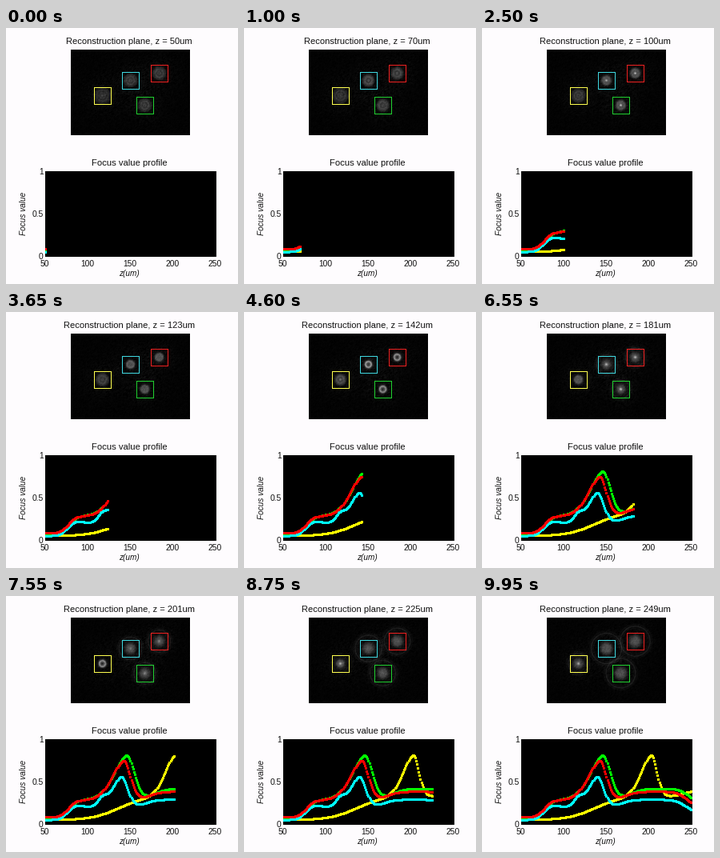
Recreate the animation shown at these times as a matplotlib script. Size 290 px wide and 320 px high, loop 10 s.

```python
import numpy as np
import matplotlib.pyplot as plt
from matplotlib.animation import FuncAnimation
from matplotlib.patches import Rectangle

W, H, DPI = 290, 320, 100
PX = 72 / DPI  # points per pixel
Z0, STEPS = 50, 200

plt.rcParams["font.family"] = "Liberation Sans"
fig = plt.figure(figsize=(W / DPI, H / DPI), dpi=DPI, facecolor="#fefcfe")


def label(x, y, text, size, **kw):
    kw = {"ha": "center", "va": "baseline", "color": "#111111", **kw}
    return fig.text(x / W, 1 - y / H, text, fontsize=size * PX, **kw)


def panel(left, top, right, bottom):
    ax = fig.add_axes([left / W, 1 - bottom / H,
                       (right - left) / W, (bottom - top) / H])
    ax.set(facecolor="black", xticks=[], yticks=[],
           xlim=(left, right), ylim=(bottom, top))
    for spine in ax.spines.values():
        spine.set_visible(False)
    return ax


def rise(z, centre, width):
    return 1 / (1 + np.exp(-(z - centre) / width))


def peak(z, centre, left, right):
    width = np.where(z < centre, left, right)
    return np.exp(-(np.abs(z - centre) / width) ** 1.8)


def bump(x, centre, width):
    return np.exp(-((x - centre) / width) ** 2)


# Focus value curves: a plateau, the focus peak, then a long tail
depth = np.arange(Z0, Z0 + STEPS)


def yellow(z):
    return (.05 + .28 * rise(z, 136, 16) + .49 * peak(z, 203, 17.5, 8.6)
            + .06 * rise(z, 239, 5))


def green(z):
    return (.075 + .215 * rise(z, 78, 5) + .52 * peak(z, 146, 21.5, 12)
            + .13 * rise(z, 178, 7) - .2 * rise(z, 248, 6))


def cyan(z):
    return (.05 + .155 * rise(z, 75, 4) + .355 * peak(z, 139.5, 15, 10)
            + .02 * bump(z, 88, 8) + .085 * bump(z, 117, 8)
            + .085 * rise(z, 168, 6) - .16 * rise(z, 243, 6))


def red(z):
    return (.08 + .205 * rise(z, 77, 4.5) + .46 * peak(z, 142.5, 20, 10.5)
            + .1 * rise(z, 172, 7) - .2 * rise(z, 245, 6))


# line colour, box colour, particle centre, focus depth, curve
PARTICLES = [
    ("#ffff00", "#ffff50", (120.5, 84.5), 204, yellow),
    ("#00ff00", "#20d030", (173.5, 96.5), 146, green),
    ("#00ffff", "#40d8e0", (155.5, 65.5), 140, cyan),
    ("#ff0000", "#f02020", (191.5, 56.5), 143, red),
]

# Reconstruction panel
LEFT, TOP, RIGHT, BOTTOM = 81, 27, 230, 134
view = panel(LEFT, TOP, RIGHT, BOTTOM)
gx, gy = np.meshgrid(np.arange(LEFT, RIGHT) + .5, np.arange(TOP, BOTTOM) + .5)
dist = [np.hypot(gx - x, gy - y) for _, _, (x, y), *_ in PARTICLES]
halo = np.clip(sum(bump(r, 0, 20) for r in dist), 0, 1.3)

rng = np.random.default_rng(7)


def speckle():
    n = rng.normal(size=gx.shape)
    return (n + np.roll(n, 1, 0) + np.roll(n, 1, 1)) / 1.7


grain_a, grain_b = speckle(), speckle()


def spot(r, d):
    """Brightness at radius r of a particle d um past its focus."""
    before, after = max(-d, 0), max(d, 0)
    radius = 5 + .033 * before + .02 * after
    soft = .9 + .5 * min(after / 30, 1)
    disc = (72 - .2 * before) * rise(radius - r, 0, soft)
    if before:
        disc = disc * (.87 + .13 * np.cos(1.9 * (r - radius)))
    core = (120 * bump(d, -45, 18) + 110 * bump(d, 30, 30)
            + 25 * bump(d, -150, 25) - 70 * bump(d, 0, 11))
    rim = 75 * bump(d, 0, 14) + 30 * bump(d, -40, 40)
    far = 8 + .1 * after
    outer = 15 * min(after / 40, 1) * bump(r, far, 2.5)
    return (disc + core * bump(r, 0, 1.7) + rim * bump(r, .72 * radius, 1.1)
            + outer * (1 + .5 * np.cos(2.2 * (r - far))))


def hologram(z):
    phase = (z - Z0) / 7
    grain = grain_a * np.cos(phase) + grain_b * np.sin(phase)
    img = 3 + 5 * halo + (1 + 3.5 * halo) * grain
    for r, (_, _, _, focus, _) in zip(dist, PARTICLES):
        img = img + spot(r, z - focus)
    return np.clip(img, 0, 255)


picture = view.imshow(hologram(Z0), cmap="gray", vmin=0, vmax=255, aspect="auto",
                      interpolation="nearest", extent=(LEFT, RIGHT, BOTTOM, TOP))
for _, color, (x, y), *_ in PARTICLES:
    view.add_patch(Rectangle((x - 10.5, y - 10.5), 21, 21, fill=False,
                             ec=color, lw=PX, antialiased=False))

# Profile panel, in stage pixels
plot = panel(49, 179, 263, 286)
px = 49 + (depth - Z0) * 1.065
curves = []
for color, _, _, _, curve in PARTICLES:
    line, = plot.plot([], [], "s", color=color, ms=3 * PX, mew=0)
    curves.append((line, 285 - 106 * curve(depth)))

# Text
title = label(154.2, 20, "", 11.1)
label(154, 172, "Focus value profile", 11.2)
for i, tick in enumerate(range(50, 251, 50)):
    label(48.5 + i * 53.25, 298, str(tick), 10.2)
for y, tick in ((183, "1"), (236, "0.5"), (289, "0")):
    label(46.5, y, tick, 10.2, ha="right")
label(154, 310, "z(um)", 10, style="italic")
label(22, 231.5, "Focus value", 10, style="italic", rotation=90, va="center")


def update(i):
    z = Z0 + i
    title.set_text(f"Reconstruction plane, z = {z}um")
    picture.set_data(hologram(z))
    for line, py in curves:
        line.set_data(px[:i + 1], py[:i + 1])
    return [title, picture] + [line for line, _ in curves]


anim = FuncAnimation(fig, update, frames=STEPS, interval=50,
                     repeat=True, repeat_delay=0, blit=False)
plt.show()
```
